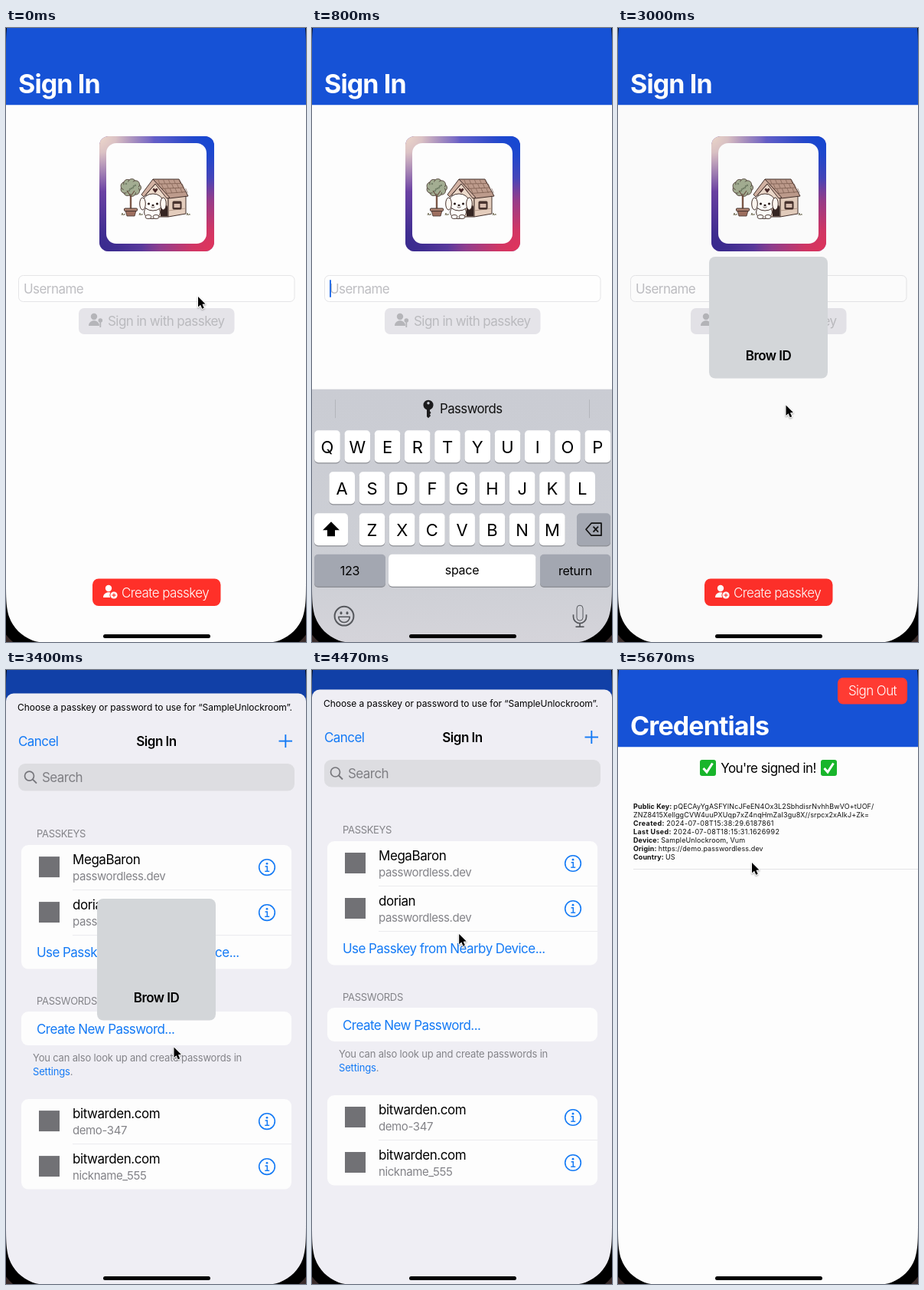
An HTML page with a canvas that plays this animation: 392x800 px, repeating every 5940 ms.

```html
<!DOCTYPE html>
<html lang="en">
<head>
<meta charset="utf-8">
<title>Passkey sign-in</title>
<style>
html, body { margin: 0; width: 100%; height: 100%; overflow: hidden; background: #000; }
canvas { display: block; width: 392px; height: 800px; }
</style>
</head>
<body>
<canvas id="stage"></canvas>
<script>
const W = 392, H = 800, LOOP = 5940, STEP = 1000 / 15;
const BLUE = '#147af5', PAPER = '#fdfdfd', GREY = '#838388', INK = '#43302b';
const canvas = document.getElementById('stage');
const ratio = window.devicePixelRatio || 1;
canvas.width = W * ratio;
canvas.height = H * ratio;
const c = canvas.getContext('2d');

// ---- timing ----
const clamp = v => Math.min(1, Math.max(0, v));
const ramp = (t, a, b) => clamp((t - a) / (b - a));
const mix = (a, b, k) => a + (b - a) * k;
const smooth = k => k * k * (3 - 2 * k);
function spring(t, start) {
  const x = Math.max(0, t - start) * 0.01826;
  return 1 - (1 + x) * Math.exp(-x);
}

// ---- drawing helpers ----
function box(x, y, x2, y2, r, fill, stroke) {
  c.beginPath();
  c.roundRect(x, y, x2 - x, y2 - y, r);
  paint(fill, stroke);
}
function paint(fill, stroke, width = 1) {
  if (fill) { c.fillStyle = fill; c.fill(); }
  if (stroke) { c.strokeStyle = stroke; c.lineWidth = width; c.stroke(); }
}
function poly(points, fill, stroke, width) {
  c.beginPath();
  points.forEach(([x, y]) => c.lineTo(x, y));
  c.closePath();
  paint(fill, stroke, width);
}
function line(points, stroke, width = 1) {
  c.beginPath();
  points.forEach(([x, y]) => c.lineTo(x, y));
  paint(null, stroke, width);
}
function oval(x, y, rx, ry, fill, stroke, width) {
  c.beginPath();
  c.ellipse(x, y, rx, ry, 0, 0, Math.PI * 2);
  paint(fill, stroke, width);
}
const dot = (x, y, r, fill, stroke, width) => oval(x, y, r, r, fill, stroke, width);

// y is the middle of the capital letters; returns the end of the text
function text(s, x, y, { size = 17, color = '#000', weight = 400, align = 'left', track = -0.033 } = {}) {
  c.font = `${weight} ${size}px Inter, sans-serif`;
  c.letterSpacing = `${size * track}px`;
  c.textAlign = align;
  c.fillStyle = color;
  c.fillText(s, x, y + size * 0.36);
  return x + c.measureText(s).width;
}
function shifted(x, y, draw) {
  c.save();
  c.translate(x, y);
  draw();
  c.restore();
}

// ---- sign-in page ----
function header(title) {
  c.fillStyle = PAPER;
  c.fillRect(0, 0, W, H + 4);
  c.fillStyle = '#1652d6';
  c.fillRect(0, 0, W, 100.25);
  text(title, 16, 73, { size: 34, weight: 700, color: '#fff', track: -0.026 });
}

function person(x, y, color) {
  dot(x + 7, y - 4, 4.2, color);
  c.beginPath();
  c.moveTo(x, y + 8);
  c.bezierCurveTo(x, y - 1, x + 14, y - 1, x + 14, y + 8);
  c.closePath();
  paint(color);
}

function frameGlow(x, y, r, rgb) {
  const g = c.createRadialGradient(x, y, 0, x, y, r);
  g.addColorStop(0, `rgba(${rgb},1)`);
  g.addColorStop(0.3, `rgba(${rgb},.85)`);
  g.addColorStop(1, `rgba(${rgb},0)`);
  box(122, 141, 272, 291, 12, g);
}

function picture() {
  box(122, 141, 272, 291, 12, '#6c42a4');
  frameGlow(200, 141, 60, '108,98,200');
  frameGlow(122, 291, 80, '56,42,142');
  frameGlow(272, 141, 85, '18,72,212');
  frameGlow(272, 291, 95, '226,52,90');
  frameGlow(122, 141, 72, '238,216,202');
  box(131, 150, 262, 281, 13, PAPER);

  // tree
  line([[163, 216], [163, 237]], '#7b5747', 2.4);
  for (let i = 0; i < 9; i++) {
    const a = i * Math.PI * 2 / 9;
    dot(163 + Math.cos(a) * 8.5, 208 + Math.sin(a) * 6.5, 5, '#a3ad92', INK, 0.8);
  }
  oval(163, 208, 10, 8, '#a3ad92');
  for (let i = 0; i < 8; i++) {
    dot(157 + (i * 5) % 13, 203 + (i * 7) % 11, 1.2, '#75836a');
  }
  line([[158, 212], [163, 219], [168, 212]], '#6b4d40', 1.1);
  poly([[156, 238], [170, 238], [168, 245], [158, 245]], '#9d6f5f', INK, 0.8);
  box(154.5, 235, 171.5, 238.5, 1, '#b08573', INK);

  // house
  poly([[183, 217], [196, 202], [212, 219], [212, 246], [183, 246]], '#ecd9ca', INK, 1);
  poly([[212, 219], [235, 217], [235, 242], [212, 246]], '#e4cdbd', INK, 1);
  line([[212, 238], [235, 235]], '#a58878', 0.7);
  box(202, 230, 211, 245.5, [4, 4, 0, 0], '#352522');
  poly([[192, 197], [226, 197], [238, 219], [213, 222]], '#bd9b8c', INK, 1);
  for (let i = 1; i < 4; i++) {
    line([[192 + i * 5.2, 197 + i * 6.2], [226 + i * 3, 197 + i * 5.5]], '#7d5d50', 0.8);
    for (let j = 0; j < 5; j++) {
      const x = 194 + i * 4.5 + j * 6.8, y = 191 + i * 6;
      line([[x, y], [x + 2.5, y + 6]], '#7d5d50', 0.7);
    }
  }
  poly([[192, 197], [177, 217], [180, 220], [195, 203], [210, 222], [214, 221]], '#d2b2a3', INK, 1);
  poly([[195, 215], [191.5, 210.5], [193, 208.5], [195, 210], [197, 208.5], [198.5, 210.5]], '#4a2a29');
  box(218, 226, 229, 236, 1, '#4a3430', INK);
  box(219.5, 229, 227.5, 234, 0.5, '#d9beb0');

  // puppy
  oval(191, 240, 10.5, 8.5, '#fffdfa', INK, 1);
  oval(186, 246, 4, 2.6, '#fffdfa', INK, 0.9);
  oval(196, 246, 4, 2.6, '#fffdfa', INK, 0.9);
  oval(192, 227, 13.5, 11, '#fffdfa', INK, 1);
  oval(178.5, 229, 3.8, 8, '#fff8f2', INK, 1);
  oval(205.5, 229, 3.8, 8, '#fff8f2', INK, 1);
  dot(186.5, 229, 1.6, '#2b1d1b');
  dot(197.5, 229, 1.6, '#2b1d1b');
  oval(192, 231, 1.6, 1.2, '#2b1d1b');
  line([[189.5, 233], [192, 234.3], [194.5, 233]], INK, 0.8);

  for (const x of [151, 174, 236]) {
    line([[x, 244], [x + 1, 241], [x + 2, 244], [x + 4, 242], [x + 4, 244]], '#6f6a52', 0.9);
  }
}

function signInPage(focused) {
  header('Sign In');
  picture();
  box(16.5, 322.5, 377, 356.5, 6, '#fefefe', '#e5e5e7');
  text('Username', 23, 340, { color: '#bebec2' });
  if (focused) box(23, 328, 25, 351, 1, '#2a70e8');

  box(95, 365, 298.5, 399, 7, '#e5e4e9');
  person(108, 380, '#b5b5b9');
  dot(123.3, 381, 2.8, '#b5b5b9');
  line([[123.3, 382], [123.3, 390]], '#b5b5b9', 1.8);
  text('Sign in with passkey', 133, 382, { color: '#bababe' });

  box(113, 717.5, 280.5, 753, 8, '#ff3029');
  person(127, 734, '#fff');
  dot(141, 739, 5.6, '#ff3029');
  dot(141, 739, 4.6, '#fff');
  line([[138.4, 739], [143.6, 739]], '#ff3029', 1.2);
  line([[141, 736.4], [141, 741.6]], '#ff3029', 1.2);
  text('Create passkey', 151, 736, { color: '#fff', weight: 350 });
}

// ---- keyboard ----
function key(x, y, x2, fill = '#fff') {
  box(x, y + 1, x2, y + 43.2, 5, '#8b8d93');
  box(x, y, x2, y + 42, 5, fill);
}
function keyRow(letters, first, y) {
  [...letters].forEach((letter, i) => {
    const x = first + i * 39.25;
    key(x - 16.8, y, x + 16.8);
    text(letter, x, y + 21.5, { size: 22, align: 'center', track: 0 });
  });
}
function keyboard() {
  const bg = c.createLinearGradient(0, 470, 0, 800);
  bg.addColorStop(0, '#caccd3');
  bg.addColorStop(0.75, '#cdcfd5');
  bg.addColorStop(1, '#d5d4da');
  c.fillStyle = bg;
  c.fillRect(0, 470.5, W, 360);
  line([[30.5, 484], [30.5, 508]], '#b3b5bb');
  line([[362.5, 484], [362.5, 508]], '#b3b5bb');

  dot(152, 491, 6.5, '#1b1b1d');
  dot(152, 488.5, 1.7, '#caccd3');
  poly([[150, 496], [154, 496], [154, 499], [155.5, 501], [154, 503], [155, 505], [152, 508], [150, 506]], '#1b1b1d');
  text('Passwords', 167, 496, { size: 16.8, color: '#111' });

  keyRow('QWERTYUIOP', 20, 524);
  keyRow('ASDFGHJKL', 39.2, 578);
  keyRow('ZXCVBNM', 78.4, 632);
  key(3, 632, 47);
  poly([[25, 643], [36, 654], [30, 654], [30, 662], [20, 662], [20, 654], [14, 654]], '#000');
  const dark = '#a3a7b1';
  key(346, 632, 390, dark);
  c.lineJoin = 'round';
  poly([[358, 653], [365, 645], [378, 645], [378, 661], [365, 661]], null, '#111', 1.7);
  line([[367.5, 649.5], [374, 656.5]], '#111', 1.7);
  line([[374, 649.5], [367.5, 656.5]], '#111', 1.7);

  key(3, 685.5, 96, dark);
  key(100, 685.5, 292.5);
  key(298, 685.5, 390, dark);
  const small = { size: 16, align: 'center', track: -0.015 };
  text('123', 49.5, 707, small);
  text('space', 196, 706, small);
  text('return', 344, 707, small);

  const icon = '#55575c';
  dot(42, 766, 12.4, null, icon, 2);
  oval(38, 762, 1.5, 2, icon);
  oval(46, 762, 1.5, 2, icon);
  c.beginPath();
  c.arc(42, 767, 7.3, 0, Math.PI);
  c.closePath();
  paint(null, icon, 1.6);
  box(346, 752, 354, 772, 4, null, icon);
  c.beginPath();
  c.moveTo(341.5, 764);
  c.lineTo(341.5, 767);
  c.arc(350, 767, 8.5, Math.PI, 0, true);
  c.lineTo(358.5, 764);
  paint(null, icon, 1.7);
  line([[350, 775.5], [350, 780]], icon, 1.7);
  line([[344.5, 780], [355.5, 780]], icon, 1.7);
}

// ---- passkey chooser ----
function account(name, detail, y) {
  box(43, y - 14, 70, y + 13, 0, '#717175');
  text(name, 87, y - 10.5, { track: -0.026 });
  text(detail, 87, y + 11.5, { size: 15, color: GREY, track: -0.027 });
  dot(341, y, 10.3, null, BLUE, 1.6);
  dot(341, y - 4.8, 1.4, BLUE);
  line([[338.6, y - 1.2], [341.3, y - 1.2], [341.3, y + 5]], BLUE, 1.5);
  line([[338.2, y + 5.2], [344.2, y + 5.2]], BLUE, 1.4);
}
const divider = y => line([[87, y], [373, y]], '#ebebee');

function chooser(pressed) {
  const note = { size: 13, color: GREY, track: -0.014 };
  const heading = { ...note, track: -0.025 };
  box(0, 25.5, W, 830, [10, 10, 0, 0], '#efeef4');
  text('Choose a passkey or password to use for “SampleUnlockroom”.', 194.5, 43.7,
    { size: 12, align: 'center', track: -0.004 });
  text('Cancel', 16, 88, { color: BLUE });
  text('Sign In', 196.5, 88, { weight: 600, align: 'center', track: -0.03 });
  line([[356.5, 87.5], [374, 87.5]], BLUE, 1.9);
  line([[365.3, 79], [365.3, 96]], BLUE, 1.9);

  box(16, 117, 377, 152.5, 9, '#dddde1');
  dot(30.5, 133, 6, null, '#76767b', 1.7);
  line([[35, 137.5], [40, 142.5]], '#76767b', 1.9);
  text('Search', 47, 135, { color: '#7e7e83' });

  text('PASSKEYS', 40, 208, heading);
  box(20, 223, 373, 384.5, 9, PAPER);
  if (pressed) box(20, 223, 373, 281.5, [9, 9, 0, 0], '#cfced3');
  account('MegaBaron', 'passwordless.dev', 252);
  account('dorian', 'passwordless.dev', 311);
  divider(281.5);
  divider(340.5);
  text('Use Passkey from Nearby Device...', 40, 363, { color: BLUE });

  text('PASSWORDS', 40, 426, heading);
  box(20, 440, 373, 484, 9, PAPER);
  text('Create New Password...', 40, 463, { color: BLUE });
  text('You can also look up and create passwords in', 35, 500, note);
  const end = text('Settings', 35, 518, { ...note, color: BLUE });
  text('.', end, 518, note);

  box(20, 554, 373, 671.5, 9, PAPER);
  account('bitwarden.com', 'demo-347', 583);
  account('bitwarden.com', 'nickname_555', 642);
  divider(612.5);
}

// ---- credentials page ----
function tick(x, y) {
  box(x, y, x + 21, y + 21, 3, '#18b52b');
  line([[x + 4.5, y + 11], [x + 9, y + 16], [x + 16.5, y + 4.5]], '#fff', 3);
}
function credentialsPage() {
  header('Credentials');
  box(287, 10, 378, 44.5, 7, '#ff3b33');
  text('Sign Out', 332.5, 27, { color: '#fff', weight: 300, align: 'center' });
  tick(107, 117);
  tick(265, 117);
  text("You're signed in!", 196.5, 127.5, { align: 'center' });

  const tiny = { size: 9, track: 0.012, color: '#111' };
  const dated = { ...tiny, track: 0.038 };
  const rows = [
    ['Public Key: ', 'pQECAyYgASFYINcJFeEN4Ox3L2SbhdisrNvhhBwVO+tUOF/', tiny],
    ['', 'ZNZ8415XellggCVW4uuPXUqp7xZ4nqHmZaI3gu8X//srpcx2xAIkJ+Zk=', tiny],
    ['Created: ', '2024-07-08T15:38:29.6187861', dated],
    ['Last Used: ', '2024-07-08T18:15:31.1626992', dated],
    ['Device: ', 'SampleUnlockroom, Vum', tiny],
    ['Origin: ', 'https://demo.passwordless.dev', tiny],
    ['Country: ', 'US', tiny]
  ];
  rows.forEach(([label, value, style], i) => {
    const y = 178 + i * 10.9;
    text(value, text(label, 20, y, { ...style, weight: 700 }), y, style);
  });
  line([[20, 259.5], [W, 259.5]], '#e4e4e6');
}

// ---- overlays ----
function faceBox(alpha) {
  c.globalAlpha = alpha;
  box(119, 298, 274, 456.5, 8, '#d3d6d9');
  text('Brow ID', 196.5, 426.5, { weight: 600, align: 'center' });
  c.globalAlpha = 1;
}

function pointer(t) {
  if (t > 200 && t < 860) return;
  const down = smooth(ramp(t, 860, 1200)), up = smooth(ramp(t, 4190, 4670));
  const x = mix(mix(250.5, 219, down), 174.5, up);
  const y = mix(mix(349.5, 491, down), 250.5, up);
  shifted(x, y, () => {
    c.shadowColor = 'rgba(0,0,0,.35)';
    c.shadowBlur = 2;
    c.shadowOffsetY = 1;
    c.lineJoin = 'round';
    const arrow = [[0.5, 0.5], [0.5, 14], [3.6, 11.2], [5.8, 16.3], [8.2, 15.3], [6, 10.3], [10, 10]];
    poly(arrow, null, '#fff', 2);
    c.shadowColor = 'transparent';
    poly(arrow, '#000');
  });
}

// One corner of the screen, with curvature that eases into the straight sides
function corner(x, y, sx, sy, r) {
  const at = (u, v) => [x + sx * u * r, y + sy * v * r];
  c.beginPath();
  c.moveTo(...at(-1, -1));
  c.lineTo(...at(-1, 1.529));
  c.lineTo(...at(0, 1.529));
  c.bezierCurveTo(...at(0, 1.088), ...at(0, 0.868), ...at(0.075, 0.631));
  c.bezierCurveTo(...at(0.169, 0.373), ...at(0.373, 0.169), ...at(0.631, 0.075));
  c.bezierCurveTo(...at(0.868, 0), ...at(1.088, 0), ...at(1.529, 0));
  c.lineTo(...at(1.529, -1));
  c.closePath();
}
function bezel() {
  const top = -50, bottom = 802, r = 55;
  for (const [x, sx] of [[0, 1], [W, -1]]) {
    for (const [y, sy] of [[top, 1], [bottom, -1]]) {
      corner(x, y, sx, sy, r);
      paint('#000');
      corner(x - sx * 15, y - sy * 15, sx, sy, r + 15);
      paint('#3a2c2b');
    }
  }
}

function render(t) {
  c.setTransform(ratio, 0, 0, ratio, 0, 0);
  const push = 1 - (1 - ramp(t, 5370, 5650)) ** 3;
  if (push < 1) shifted(-push * W * 0.3, 0, () => signInPage(t > 130 && t < 1290));
  if (push > 0) shifted((1 - push) * W, 0, credentialsPage);

  const keys = spring(t, 260) - spring(t, 1285);
  if (t < 1660 && keys > 0) shifted(0, (1 - keys) * 340, keyboard);

  const face = ramp(t, 2050, 2250) * (1 - ramp(t, 3720, 3930));
  const sheet = spring(t, 3010) - spring(t, 4863);
  c.fillStyle = `rgba(0,0,0,${Math.max(face * 0.012, sheet * 0.22)})`;
  c.fillRect(0, 0, W, H);
  if (sheet > 0.001 && t < 5390) shifted(0, (1 - sheet) * 777, () => chooser(t > 4710));
  if (face > 0) faceBox(face);

  box(127, 790, 267, 795, 2.5, '#000');
  bezel();
  pointer(t);
}

const started = performance.now();
function tickFrame() {
  const t = (performance.now() - started) % LOOP;
  render(Math.floor((t + 1) / STEP) * STEP);
  requestAnimationFrame(tickFrame);
}
tickFrame();
</script>
</body>
</html>
```
